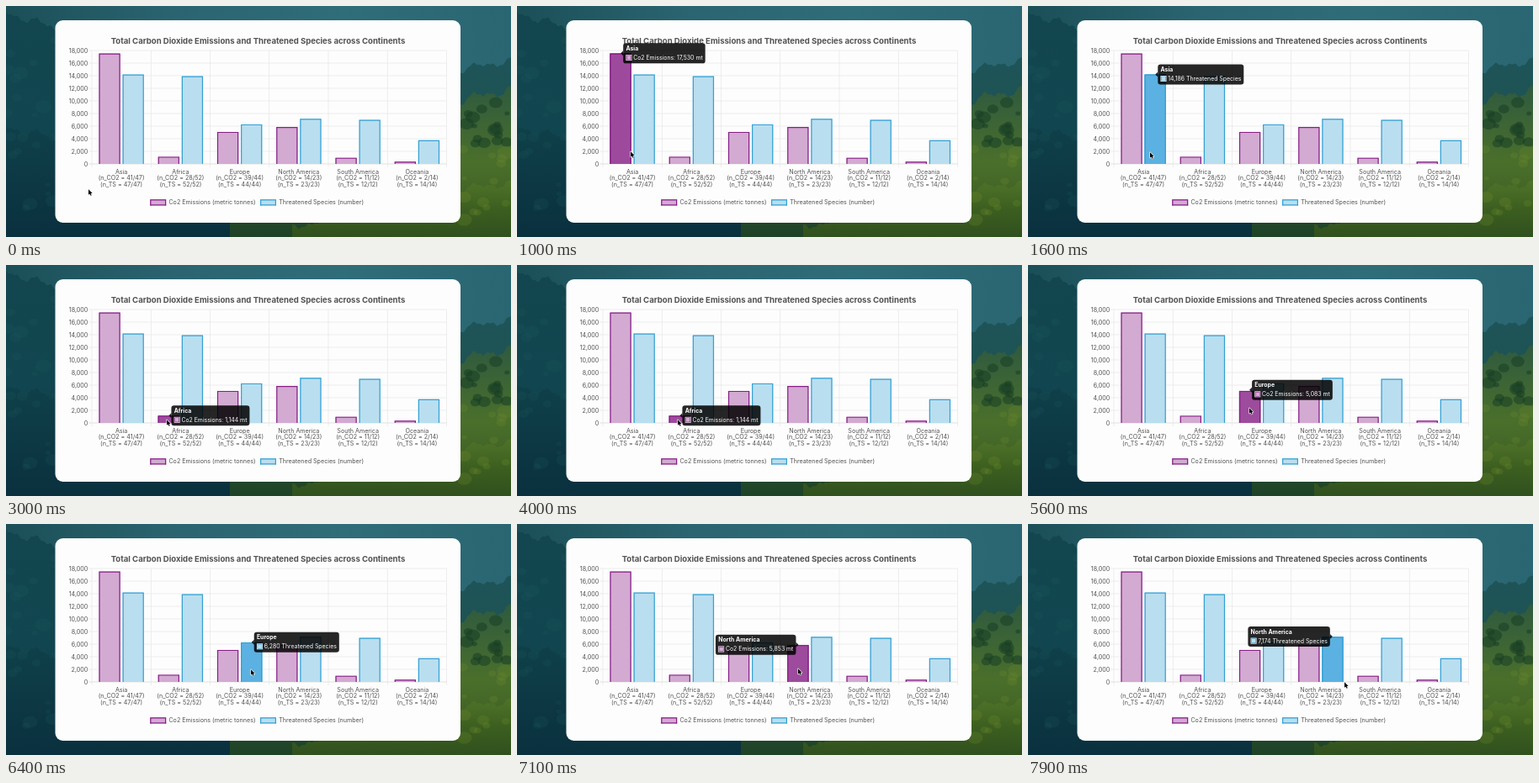
Write an HTML page with a canvas that moves like this. It is 600 px wide and 275 px high and loops after 8000 ms.

```html
<!DOCTYPE html>
<html lang="en">
<head>
<meta charset="utf-8">
<title>Emissions and threatened species</title>
<style>
html, body { margin: 0; width: 100%; height: 100%; overflow: hidden; background: #0c3844; }
canvas { display: block; width: 600px; height: 275px; }
</style>
</head>
<body>
<canvas id="stage"></canvas>
<script>
const W = 600, H = 275, LOOP = 8000;
const canvas = document.getElementById('stage');
const ctx = canvas.getContext('2d');
const dpr = window.devicePixelRatio || 1;
canvas.width = W * dpr;
canvas.height = H * dpr;

const FONT = 'Inter, "Open Sans", sans-serif';
const INK = '#525252';
const TEXT = 7.15, TIP = 6.9;
const plot = { x: 102, y: 53, w: 421.5, h: 135, max: 18000 };
const base = plot.y + plot.h;
const catW = plot.w / 6;
const barW = catW * 0.36;

// name, emissions, species, sample sizes
const rows = [
  ['Asia', 17530, 14186, '41/47', '47/47'],
  ['Africa', 1144, 13928, '28/52', '52/52'],
  ['Europe', 5083, 6280, '39/44', '44/44'],
  ['North America', 5853, 7174, '14/23', '23/23'],
  ['South America', 978, 7003, '11/12', '12/12'],
  ['Oceania', 352, 3752, '2/14', '14/14']
];
const series = [
  { label: 'Co2 Emissions (metric tonnes)', line: '#861f86', fill: '#d3aad2', hover: '#9d4a9d',
    tip: v => `Co2 Emissions: ${v} mt` },
  { label: 'Threatened Species (number)', line: '#34a0d4', fill: '#b9deef', hover: '#5bb1e1',
    tip: v => `${v} Threatened Species` }
];

const bars = rows.flatMap((row, i) => series.map((s, k) => {
  const value = row[k + 1];
  const h = value / plot.max * plot.h;
  const cx = plot.x + catW * (i + 0.5) + (k - 0.5) * catW * 0.4;
  return { name: row[0], s, cx, x: cx - barW / 2, y: base - h, h, text: s.tip(value.toLocaleString('en-US')) };
}));

// Pointer stops: arrival time, x, y
const GLIDE = 700;
const stops = [
  [0, 98, 219], [1000, 135, 174], [1500, 145, 175], [2800, 191, 185], [4790, 218, 145],
  [5600, 263, 171], [6400, 291, 174], [7100, 334, 173], [7900, 376, 189]
];

const clamp = v => Math.max(0, Math.min(1, v));
const mix = (a, b, p) => a + (b - a) * p;
const outQuart = p => 1 - (1 - clamp(p)) ** 4;
const smooth = p => p * p * (3 - 2 * p);

function pointer(t) {
  let i = 1;
  while (i < stops.length - 1 && stops[i][0] < t) i++;
  const [t0, x0, y0] = stops[i - 1], [t1, x1, y1] = stops[i];
  const e = smooth(clamp(1 - (t1 - t) / Math.min(GLIDE, t1 - t0)));
  return { x: mix(x0, x1, e), y: mix(y0, y1, e) };
}

function hit({ x, y }) {
  return bars.find(b => Math.abs(x - b.cx) < barW / 2 + 2 && y > b.y - 2 && y < base + 2) || null;
}

// Hover spans follow from the pointer's course
const spans = [{ start: -1000, bar: null }];
for (let t = 0; t < LOOP; t += 10) {
  const bar = hit(pointer(t));
  if (bar !== spans[spans.length - 1].bar) spans.push({ start: t, bar });
}

function label(text, x, y, size, { weight = 400, align = 'left', color = INK } = {}) {
  ctx.font = `${weight} ${size}px ${FONT}`;
  ctx.textAlign = align;
  ctx.fillStyle = color;
  ctx.fillText(text, x, y);
}

function rect(x, y, w, h, color) {
  ctx.fillStyle = color;
  ctx.fillRect(x, y, w, h);
}

function rounded(x, y, w, h, r, color) {
  ctx.fillStyle = color;
  ctx.beginPath();
  ctx.roundRect(x, y, w, h, r);
  ctx.fill();
}

function gradient(x0, y0, x1, y1, ...colors) {
  const g = ctx.createLinearGradient(x0, y0, x1, y1);
  colors.forEach((c, i) => g.addColorStop(i / (colors.length - 1), c));
  return g;
}

function seeded(seed) {
  return () => (seed = seed * 16807 % 2147483647) / 2147483647;
}

// A hill line from (x0, y0) to (x1, y1), filled down to the bottom edge
function ridge(x0, y0, x1, y1, rough, ...colors) {
  ctx.fillStyle = gradient(0, Math.min(y0, y1), 0, H, ...colors);
  ctx.beginPath();
  ctx.moveTo(x0, H);
  for (let x = x0; x <= x1; x += 2) {
    const wave = Math.sin(x * 0.11) + 0.5 * Math.sin(x * 0.29 + 1) + 0.25 * Math.sin(x * 0.8);
    ctx.lineTo(x, mix(y0, y1, (x - x0) / (x1 - x0)) + wave * rough);
  }
  ctx.lineTo(x1, H);
  ctx.fill();
}

function trees(count, x, y, w, h, seed, color) {
  const rnd = seeded(seed);
  ctx.fillStyle = color;
  for (let i = 0; i < count; i++) {
    const r = 3 + rnd() * 7;
    ctx.beginPath();
    ctx.ellipse(x + rnd() * w, y + rnd() * h, r, r * 0.8, 0, 0, Math.PI * 2);
    ctx.fill();
  }
}

function drawBackdrop() {
  rect(0, 0, W, H, gradient(0, 0, W, 0, '#1b4f57', '#2a6470', '#2f6d79', '#2a6672'));
  ridge(0, 4, 130, 62, 5, '#13464e', '#114650', '#0b3441');
  ridge(0, 140, 340, 262, 5, '#0f414a', '#0a303e');
  ridge(520, 84, W, 62, 4, '#1e5458', '#20524a');
  ridge(520, 122, W, 96, 5, '#2f5a3f', '#4a6f2b', '#36551f');
  ridge(266, 250, W, 250, 3, '#23482c', '#1e4226');
  ridge(340, 262, W, 208, 4, '#4f7229', '#3c5f20', '#30501e');
  trees(16, 540, 112, 60, 55, 7, 'rgba(24,62,36,0.55)');
  trees(14, 540, 165, 60, 95, 31, 'rgba(110,140,45,0.25)');
  trees(22, 0, 40, 60, 220, 53, 'rgba(36,96,96,0.18)');
}

function outlined(x, y, w, h, s, fill) {
  const d = 0.6;
  rect(x, y, w, h, fill);
  ctx.strokeStyle = s.line;
  ctx.lineWidth = d * 2;
  ctx.beginPath();
  ctx.moveTo(x + d, y + h);
  ctx.lineTo(x + d, y + d);
  ctx.lineTo(x + w - d, y + d);
  ctx.lineTo(x + w - d, y + h);
  ctx.stroke();
}

// How strongly a bar is lit, 0 to 1
function heat(bar, t) {
  let level = 0;
  spans.forEach((s, i) => {
    if (s.start > t) return;
    const end = Math.min(t, i + 1 < spans.length ? spans[i + 1].start : LOOP);
    level = mix(level, s.bar === bar ? 1 : 0, outQuart((end - s.start) / 400));
  });
  return level;
}

function drawBar(b, level) {
  outlined(b.x, b.y, barW, b.h, b.s, b.s.fill);
  ctx.globalAlpha = level;
  outlined(b.x, b.y, barW, b.h, b.s, b.s.hover);
  ctx.globalAlpha = 1;
}

function drawChart(t) {
  rounded(58.5, 17, 481.5, 241, 9, '#fdfdfd');
  label('Total Carbon Dioxide Emissions and Threatened Species across Continents', 299.5, 45.4, 9.55,
    { weight: 700, align: 'center' });

  for (let v = 0; v <= plot.max; v += 2000) {
    const y = base - v / plot.max * plot.h;
    rect(plot.x - 3.5, y - 0.35, plot.w + 3.5, 0.7, v ? '#e6e6e6' : '#d5d5d5');
    label(v.toLocaleString('en-US'), 97.3, y + 2.5, TEXT, { align: 'right' });
  }
  for (let i = 0; i <= 6; i++) rect(plot.x + catW * i - 0.35, plot.y, 0.7, plot.h + 4, '#e6e6e6');

  rows.forEach(([name, , , co2, ts], i) => {
    [name, `(n_CO2 = ${co2})`, `(n_TS = ${ts})`].forEach((s, k) =>
      label(s, plot.x + catW * (i + 0.5), 199.6 + k * 7.8, TEXT, { align: 'center' }));
  });

  bars.forEach(b => drawBar(b, heat(b, t)));

  series.forEach((s, k) => {
    const x = 171.2 + k * 130.8;
    outlined(x, 230.3, 19, 7.2, s, s.fill);
    rect(x, 236.3, 19, 1.2, s.line);
    label(s.label, x + 22.2, 236.4, TEXT);
  });
}

function tipBox(b) {
  ctx.font = `${TIP}px ${FONT}`;
  const w = ctx.measureText(b.text).width + 15;
  const left = b.cx > plot.x + plot.w / 2;
  return { x: left ? b.cx - 3.1 - w : b.cx + 3.1, y: b.y - 12.2, w, left };
}

function drawTip(t) {
  let i = spans.length - 1;
  while (spans[i].start > t) i--;
  const { start, bar } = spans[i];
  const prev = i ? spans[i - 1].bar : null;
  const shown = bar || prev;
  if (!shown) return;
  const age = t - start;
  const fade = clamp(age / 200);
  const alpha = !bar ? 1 - fade : prev ? 1 : fade;

  // Glide over from the bar shown before
  const box = tipBox(shown);
  const last = bar && spans.slice(0, i).reverse().find(s => s.bar);
  if (last) {
    const from = tipBox(last.bar), p = outQuart(age / 400);
    for (const key of ['x', 'y', 'w']) box[key] = mix(from[key], box[key], p);
  }
  const { x, y, w, left } = box, h = 24;
  const edge = left ? x + w : x, dir = left ? 3 : -3;
  ctx.save();
  ctx.globalAlpha = alpha;
  rounded(x, y, w, h, 3.2, 'rgba(0,0,0,0.85)');
  ctx.beginPath();
  ctx.moveTo(edge, y + h / 2 - 3);
  ctx.lineTo(edge + dir, y + h / 2);
  ctx.lineTo(edge, y + h / 2 + 3);
  ctx.fill();
  label(shown.name, x + 3.2, y + 8.6, TIP, { weight: 700, color: '#fff' });
  rect(x + 3.2, y + 13.6, 7, 7, '#fff');
  rect(x + 3.8, y + 14.2, 5.8, 5.8, shown.s.line);
  rect(x + 4.4, y + 14.8, 4.6, 4.6, shown.s.fill);
  label(shown.text, x + 12, y + 19.6, TIP, { color: '#fff' });
  ctx.restore();
}

const arrow = new Path2D('M0 0V6.6L1.5 5.3L2.5 7.6L3.7 7.1L2.7 4.9L4.7 4.8Z');
function drawPointer({ x, y }) {
  ctx.save();
  ctx.translate(x, y - 0.8);
  ctx.lineJoin = 'round';
  ctx.lineWidth = 1.1;
  ctx.strokeStyle = '#fff';
  ctx.stroke(arrow);
  ctx.fillStyle = '#000';
  ctx.fill(arrow);
  ctx.restore();
}

function draw(t) {
  ctx.setTransform(dpr, 0, 0, dpr, 0, 0);
  drawBackdrop();
  drawChart(t);
  drawTip(t);
  drawPointer(pointer(t));
}

const began = performance.now();
function tick() {
  draw((performance.now() - began) % LOOP);
  requestAnimationFrame(tick);
}
tick();
</script>
</body>
</html>
```
